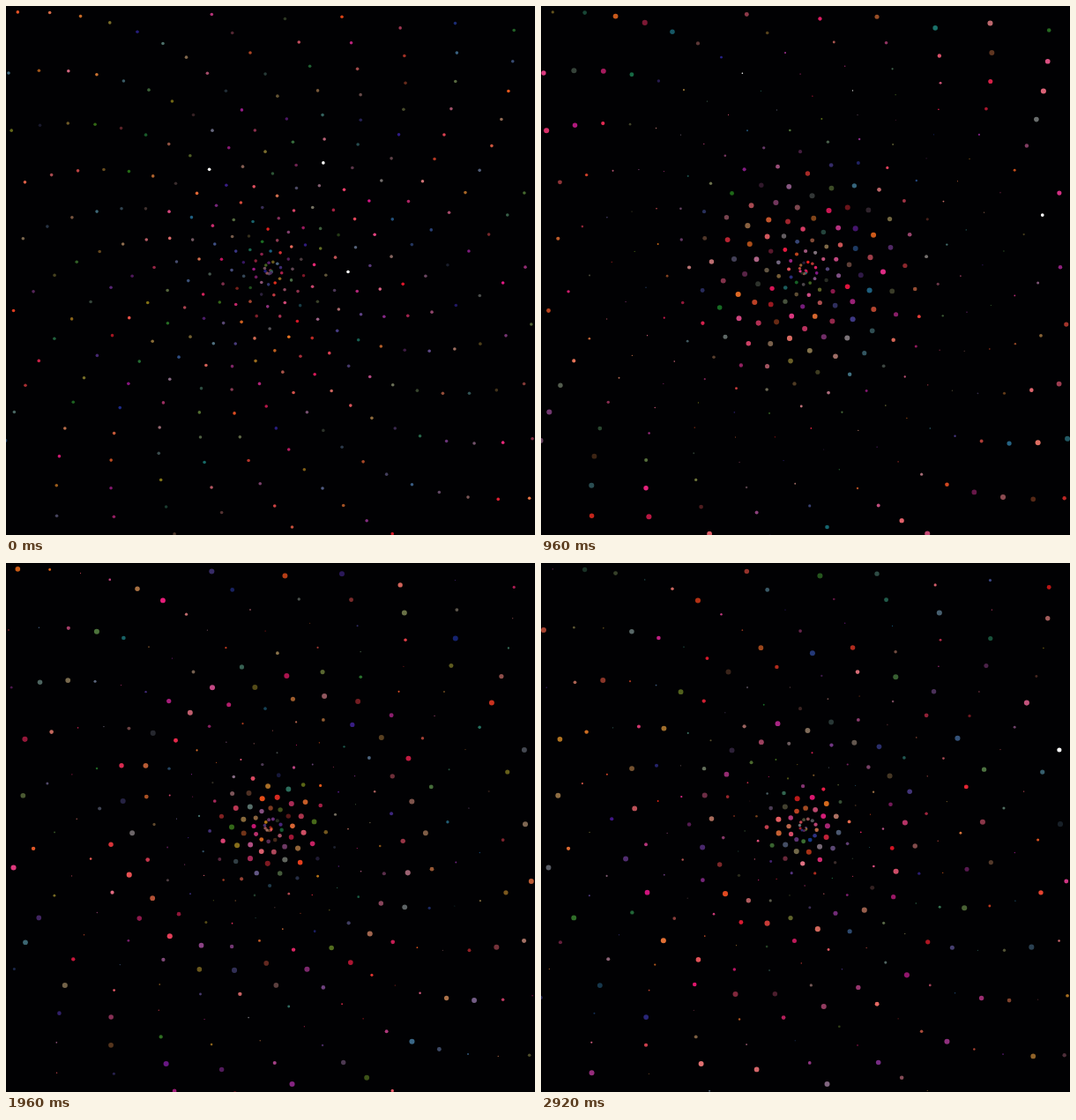
An HTML page with a canvas that plays this animation: 600 px wide and 600 px high, repeating every 2.96 s.

```html
<!DOCTYPE html>
<html lang="en">
<head>
<meta charset="utf-8">
<title>Pulsing spiral</title>
<style>
  html, body { margin: 0; width: 100%; height: 100%; overflow: hidden; background: #010103; }
  canvas { display: block; }
</style>
</head>
<body>
<canvas id="stage" width="600" height="600"></canvas>
<script>
const ctx = document.getElementById('stage').getContext('2d');
const SIZE = 600, MID = SIZE / 2, DOTS = 425;
const STEP = 40, STEPS = 74, FLASH = 0.008;

function seeded(seed) {
  let s = seed | 0;
  return () => {
    s = (s + 0x6d2b79f5) | 0;
    let h = Math.imul(s ^ (s >>> 15), s | 1);
    h ^= h + Math.imul(h ^ (h >>> 7), h | 61);
    return ((h ^ (h >>> 14)) >>> 0) / 4294967296;
  };
}

// Warm, muted colour with a rare white flash.
function pickColor(rand) {
  const channel = span => Math.round(20 + span * rand());
  const color = `rgb(${channel(212)},${channel(95)},${channel(115)})`;
  return rand() < FLASH ? '#fff' : color;
}

function draw(n) {
  const rand = seeded(n * 7919 + 17);
  ctx.fillStyle = '#010103';
  ctx.fillRect(0, 0, SIZE, SIZE);
  for (let i = 0; i < DOTS; i++) {
    const angle = i / 2;
    const radius = 1.8 + 1.25 * Math.sin(n * (0.25 + i / 1000));
    ctx.fillStyle = pickColor(rand);
    ctx.beginPath();
    ctx.arc(MID + i * Math.cos(angle), MID + i * Math.sin(angle), radius, 0, Math.PI * 2);
    ctx.fill();
  }
}

const start = performance.now();
let last = 0;
function tick() {
  const n = Math.floor(Math.max(0, performance.now() - start) / STEP) % STEPS;
  if (n !== last) draw(last = n);
  requestAnimationFrame(tick);
}
draw(0);
requestAnimationFrame(tick);
</script>
</body>
</html>
```
